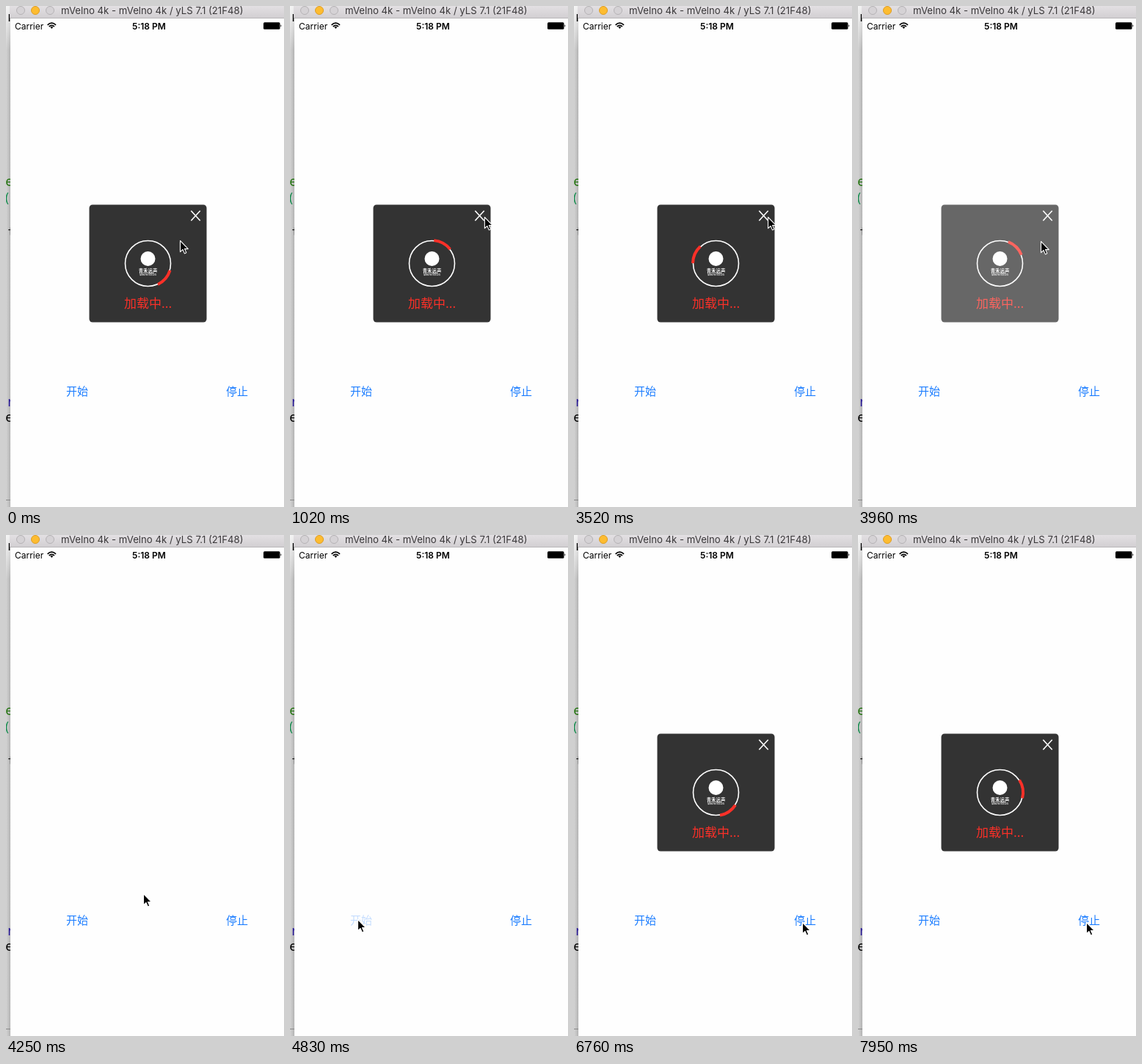
These frames come from a looping animation (379x682 px, 8000 ms). An HTML page:

```html
<!DOCTYPE html>
<html lang="zh">
<head>
<meta charset="utf-8">
<title>Loading card</title>
<style>
  html, body { margin: 0; width: 100%; height: 100%; overflow: hidden; background: #fff; }
  svg { display: block; width: 100%; height: 100%; }
  text { font-family: Inter, "Liberation Sans", sans-serif; }
  .cjk { font-family: "Noto Sans CJK SC", "Noto Sans CJK", sans-serif; }
  .code text { font: 17px "DejaVu Sans Mono", monospace; }
  .button { font-size: 15px; fill: #1a7cff; }
  .light { fill: #d5d2d5; stroke: #b5b2b5; }
</style>
</head>
<body>
<svg viewBox="0 0 379 682">
  <defs>
    <linearGradient id="bar" x2="0" y2="1">
      <stop stop-color="#e3e0e3"/><stop offset="1" stop-color="#d2cfd2"/>
    </linearGradient>
    <linearGradient id="shade">
      <stop stop-color="#d3d3d3"/><stop offset="1" stop-color="#b4b4b4"/>
    </linearGradient>
    <linearGradient id="glow" x2="0" y2="1">
      <stop stop-color="#fff" stop-opacity=".8"/><stop offset="1" stop-color="#fff" stop-opacity="0"/>
    </linearGradient>
    <clipPath id="strip"><path d="M0 0H6V682H0Z"/></clipPath>
  </defs>

  <!-- editor behind the window -->
  <g class="code" clip-path="url(#strip)">
    <path d="M0 0H6V682H0Z" fill="url(#shade)"/>
    <path d="M0 0H6V60H0Z" fill="url(#glow)"/>
    <text x="-9.5" y="21">er</text>
    <text x="-11" y="245" fill="#23730f">te</text>
    <text x="-4" y="268" fill="#0f8a4a">(</text>
    <text x="-8" y="314">.t</text>
    <text x="-9.5" y="545" fill="#2a1a9a">ar</text>
    <text x="-11" y="566">ee</text>
    <path d="M0 672.5H6" stroke="#888"/>
  </g>

  <!-- simulator window -->
  <path d="M6 16H379V682H6Z" fill="#fefefe"/>
  <path d="M5 0H379V16H5Z" fill="url(#bar)"/>
  <path d="M6 16.5H379" stroke="#b9b7b9"/>
  <circle class="light" cx="20" cy="6" r="5.5"/>
  <circle cx="40" cy="6" r="5.5" fill="#fdbc30" stroke="#dd9d25"/>
  <circle class="light" cx="60" cy="6" r="5.5"/>
  <text x="75" y="11" font-size="13.2" fill="#3a383a">mVelno 4k - mVelno 4k / yLS 7.1 (21F48)</text>

  <!-- status bar -->
  <text x="12" y="31.5" font-size="12">Carrier</text>
  <g fill="none" stroke="#000" stroke-width="1.7">
    <path d="M56.6 25.8Q62.3 20.4 68 25.8M58.7 28Q62.3 24.8 65.9 28"/>
    <path d="M60.3 28.8Q62.3 27.4 64.3 28.8L62.3 31Z" fill="#000" stroke="none"/>
  </g>
  <text x="195" y="31.5" font-size="12" font-weight="600" text-anchor="middle">5:18 PM</text>
  <rect x="351" y="22.3" width="22.5" height="9.4" rx="1.5"/>
  <path d="M374.4 25.3Q376.4 27 374.4 28.7Z"/>

  <text id="start" class="cjk button" x="82" y="529.5">开始</text>
  <text class="cjk button" x="300" y="529.5">停止</text>

  <g id="card">
    <rect x="113.5" y="270.5" width="160" height="160" rx="4.5" fill="#333"/>
    <path d="M252.3 278.8L264.7 292.2M264.7 278.8L252.3 292.2" stroke="#fff" stroke-width="1.6"/>
    <circle cx="193.5" cy="350.5" r="31" fill="none" stroke="#fff" stroke-width="1.6"/>
    <circle cx="193.5" cy="344" r="10" fill="#fff"/>
    <g fill="#fff" text-anchor="middle">
      <text class="cjk" x="193.5" y="363.4" font-size="6.4" font-weight="700">青禾远声</text>
      <text x="193.5" y="367.4" font-size="2.9" font-weight="600">QINGHE VOICES</text>
    </g>
    <path id="arc" fill="none" stroke="#fb3028" stroke-width="4"
          pathLength="360" stroke-dasharray="47 313" d="M225 350.5a31.5 31.5 0 1 1-63 0a31.5 31.5 0 1 1 63 0"/>
    <text class="cjk" x="161" y="411" font-size="17" fill="#fb3028">加载中...</text>
  </g>

  <path id="cursor" d="M.5 .5V15.7L4 12.5L6.4 17.9L8.8 16.8L6.5 11.6H11.3Z" fill="#000"
        stroke="#fff" stroke-width="1.1" stroke-linejoin="round"/>
</svg>
<script>
  const LOOP = 8000, STEP = 146.7, LAST = 54, TURN = 36.8;
  const CLOSE = 26, PRESS = 32, OPEN = 33;
  const $ = id => document.getElementById(id);

  // pointer stops: close button, start button, stop button
  const stops = [
    { at: 0, x: 237, y: 319 }, { at: 4, x: 265, y: 287 },
    { at: CLOSE, x: 264, y: 287 }, { at: 27, x: 249, y: 320 }, { at: 29, x: 187, y: 488 },
    { at: 31, x: 92, y: 523 }, { at: OPEN, x: 92, y: 523 },
    { at: 39, x: 303, y: 530 }, { at: 41, x: 311, y: 527 }
  ];

  const ramp = (v, from, to) => Math.min(1, Math.max(0, (v - from) / (to - from)));
  const smooth = p => p * p * (3 - 2 * p);

  function pointer(step) {
    const next = stops.findIndex(s => s.at > step);
    if (next < 0) return stops.at(-1);
    const a = stops[next - 1], b = stops[next], p = ramp(step, a.at, b.at);
    return { x: a.x + (b.x - a.x) * p, y: a.y + (b.y - a.y) * p };
  }

  function draw(now) {
    const step = Math.min(LAST, Math.floor((now % LOOP + 10) / STEP));
    const reopened = step >= OPEN;
    const angle = reopened ? (step - OPEN) * TURN - 85.5 : step * TURN + 17.5;
    const { x, y } = pointer(step);
    $('arc').setAttribute('transform', `rotate(${angle} 193.5 350.5)`);
    $('cursor').setAttribute('transform', `translate(${x} ${y})`);
    $('card').setAttribute('opacity', reopened ? 1 : 1 - smooth(ramp(step, CLOSE, CLOSE + 3)));
    $('start').setAttribute('opacity', step === PRESS ? .25 : 1);
  }

  const begin = performance.now();
  function tick() {
    draw(performance.now() - begin);
    requestAnimationFrame(tick);
  }
  tick();
</script>
</body>
</html>
```
